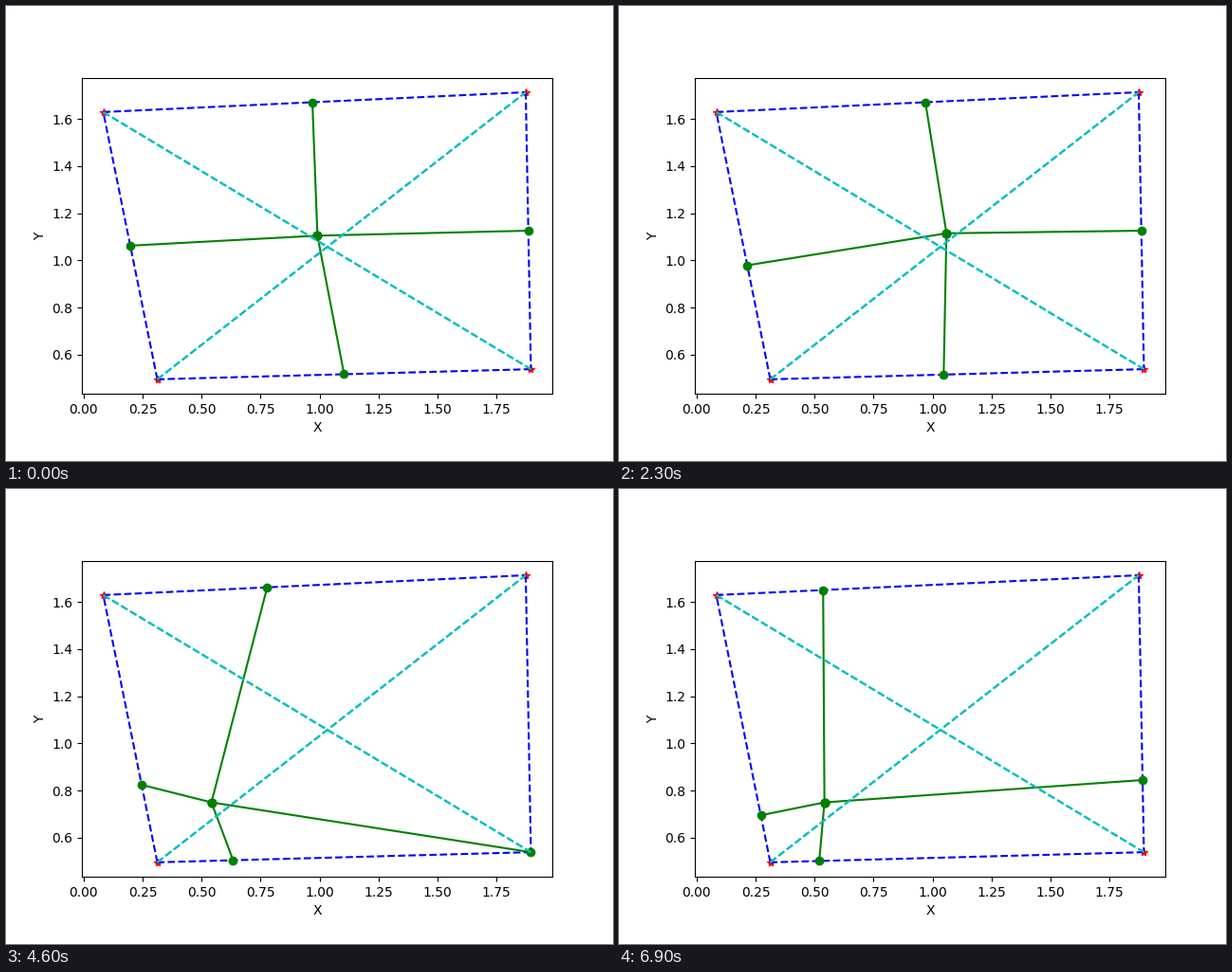
Write a matplotlib script that moves like this. It is 640 px wide and 480 px high and loops after 8 s.

```python
import numpy as np
import matplotlib.pyplot as plt
from matplotlib.animation import FuncAnimation

FRAMES = 80
INTERVAL = 100  # ms
DELAY, PERIOD = 45, 1130  # ms, cadence of the jumps

# Clockwise from the bottom left
CORNERS = np.array(
    [(0.3126, 0.496), (0.0836, 1.629), (1.8736, 1.713), (1.8956, 0.539)])
BL, TL, TR, BR = CORNERS

# The centre wanders, then settles at the last point
CENTRES = np.array([(0.991, 1.105), (1.059, 1.115), (1.021, 1.081),
                    (0.871, 0.768), (0.542, 0.750)])


def between(a, b, t):
    return a + t * (b - a)


def pose(k):
    """Centre and the four edge points after k jumps."""
    top = np.interp(k, (1, 2, 6), (0.495, 0.523, 0.253))
    bottom = 0.5 - 0.036 * k - 0.153 * (k > 3)
    left = np.interp(k, (0, 2, 3, 4, 5), (0.5, 0.353, 0.059, 0.29, 0.176))
    # slides down into the corner and comes back
    right = np.clip(0.45 * abs(k - 4.67) - 0.338, 0, 0.5)
    ends = (between(BL, TL, left), between(TL, TR, top),
            between(BR, TR, right), between(BL, BR, bottom))
    return CENTRES[min(k, len(CENTRES) - 1)], ends


fig, ax = plt.subplots(figsize=(6.4, 4.8), dpi=100)
ax.set_aspect("equal")
ax.set_xlabel("X")
ax.set_ylabel("Y")


def segment(a, b, style):
    return ax.plot(*np.array([a, b]).T, style)[0]


ax.plot(*CORNERS.T, "r*")
for a, b in zip(CORNERS, np.roll(CORNERS, -1, axis=0)):
    segment(a, b, "b--")
spokes = [segment(BL, TL, "go-") for _ in range(4)]
# each diagonal is laid down twice, which makes it bolder
for a, b in 2 * [(BL, TR), (TL, BR)]:
    segment(a, b, "c--")


def update(frame):
    centre, ends = pose(int((frame * INTERVAL - DELAY) / PERIOD))
    for spoke, end in zip(spokes, ends):
        spoke.set_data(*np.array([centre, end]).T)
    return spokes


anim = FuncAnimation(fig, update, frames=FRAMES, interval=INTERVAL,
                     repeat=True, repeat_delay=0)
plt.show()
```
